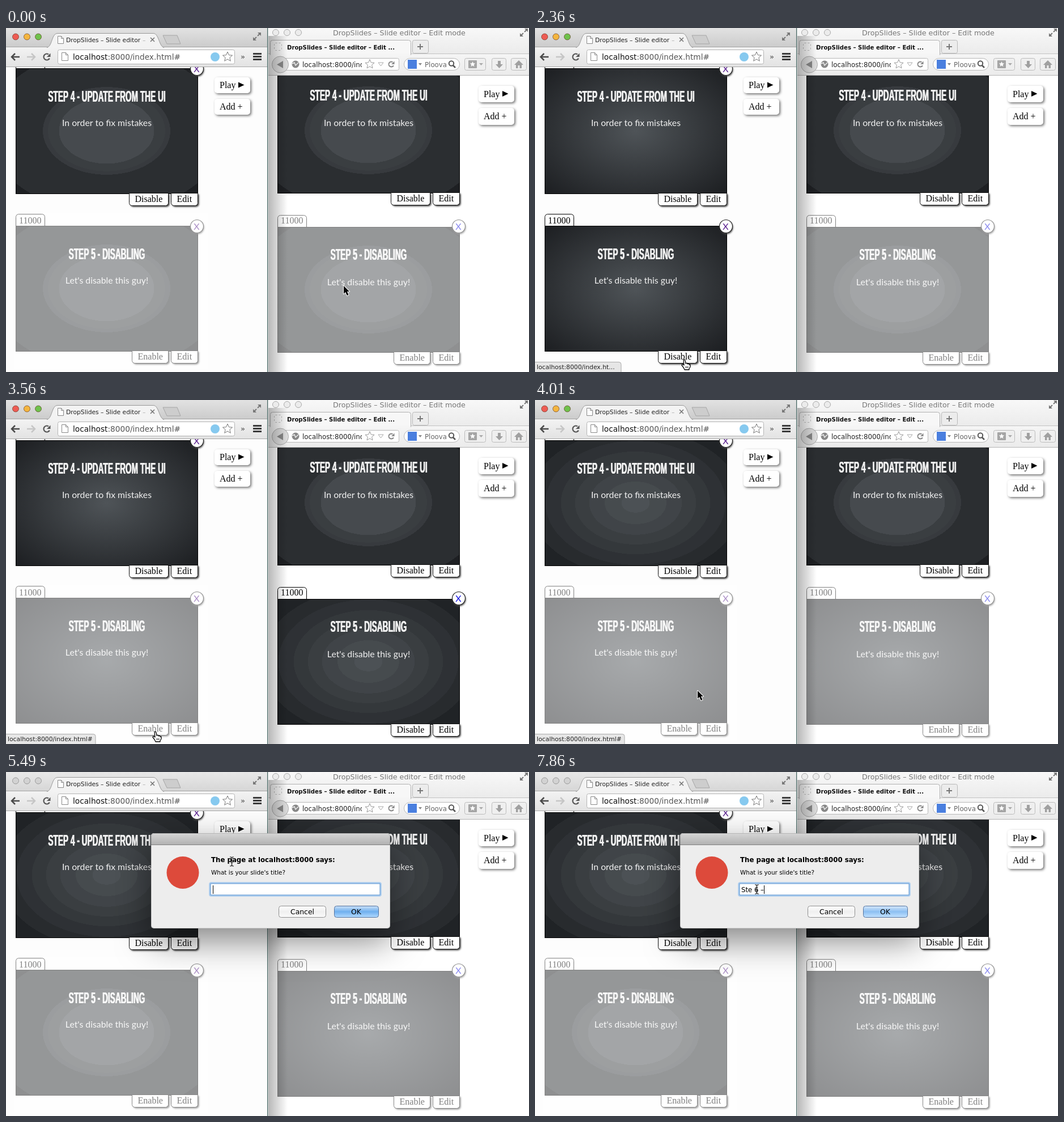
Animation of 923x607 px, one loop 8 s. Source, as an HTML page with a canvas:

```html
<!DOCTYPE html>
<html lang="en">
<head>
<meta charset="utf-8">
<title>Slide editor</title>
<style>
  html, body { margin: 0; width: 100%; height: 100%; overflow: hidden; background: #fff; }
  canvas { display: block; }
</style>
</head>
<body>
<canvas id="stage" width="923" height="607"></canvas>
<script>
const ctx = document.getElementById('stage').getContext('2d');
const LOOP = 8000, TICK = 148.2;
const UI = '"DejaVu Sans", sans-serif';
const SERIF = '16px "Liberation Serif", serif';
const BODY = '15.8px Lato, sans-serif';
const HEADING = 'bold 28px "Liberation Sans", sans-serif';
const HEADING_CONDENSE = 0.489;

// Gradient band edges as fractions of the radius; null is a smooth ramp.
const COARSE = [.37, .455, .495, .92, 1];
const MEDIUM = [.11, .24, .36, .47, .58, .7, .83, 1];
const SMOOTH = null;

// Pointer path: tick, x, y
const POINTER = [
  [0, 596, 455], [4, 385, 383], [5, 396, 385], [8, 396, 385], [9, 374, 448],
  [14, 264, 586], [26, 264, 586], [32, 400, 145], [34, 400, 145],
  [35, 398, 158], [38, 398, 158], [41, 391, 207]
];

function text(str, x, y, font, color, align = 'left') {
  ctx.font = font;
  ctx.fillStyle = color;
  ctx.textAlign = align;
  ctx.fillText(str, x, y);
}

function rect(x, y, w, h, fill) {
  ctx.fillStyle = fill;
  ctx.fillRect(x, y, w, h);
}

function paint(fill, stroke, width = 1) {
  if (fill) { ctx.fillStyle = fill; ctx.fill(); }
  if (stroke) { ctx.strokeStyle = stroke; ctx.lineWidth = width; ctx.stroke(); }
}

function box(x, y, w, h, r, fill, stroke, width) {
  ctx.beginPath();
  ctx.roundRect(x, y, w, h, r);
  paint(fill, stroke, width);
}

function circle(x, y, r, fill, stroke, width) {
  ctx.beginPath();
  ctx.arc(x, y, r, 0, 7);
  paint(fill, stroke, width);
}

function shape(points, fill, stroke, width, closed = true) {
  ctx.beginPath();
  points.forEach(([x, y]) => ctx.lineTo(x, y));
  if (closed) ctx.closePath();
  paint(fill, stroke, width);
}

const line = (points, color, width) => shape(points, null, color, width, false);

function star(cx, cy, r, fill, stroke) {
  const points = Array.from({ length: 10 }, (_, i) => {
    const a = i * Math.PI / 5 - Math.PI / 2, d = i % 2 ? r * .45 : r;
    return [cx + d * Math.cos(a), cy + d * Math.sin(a)];
  });
  shape(points, fill, stroke);
}

function ramp(y0, y1, ...colors) {
  const g = ctx.createLinearGradient(0, y0, 0, y1);
  colors.forEach((c, i) => g.addColorStop(i / (colors.length - 1), c));
  return g;
}

function withShadow(color, dx, dy, blur, draw) {
  ctx.save();
  ctx.shadowColor = color;
  ctx.shadowOffsetX = dx;
  ctx.shadowOffsetY = dy;
  ctx.shadowBlur = blur;
  draw();
  ctx.restore();
}

function clipped(x, y, w, h, draw) {
  ctx.save();
  ctx.beginPath();
  ctx.rect(x, y, w, h);
  ctx.clip();
  draw();
  ctx.restore();
}

function slideTone(f) {
  const mix = (a, b) => Math.round(a + (b - a) * f);
  return `rgb(${mix(79, 28)},${mix(84, 30)},${mix(88, 33)})`;
}

function slideBackground(x, y, bands) {
  ctx.save();
  ctx.translate(x + 160.5, y + 110.5);
  ctx.scale(1, 221 / 321);
  const g = ctx.createRadialGradient(0, 0, 0, 0, 0, 227);
  if (bands) {
    let from = 0;
    for (const to of bands) {
      const c = slideTone((from + to) / 2);
      g.addColorStop(from, c);
      g.addColorStop(to, c);
      from = to;
    }
  } else {
    g.addColorStop(0, slideTone(0));
    g.addColorStop(1, slideTone(1));
  }
  rect(-160.5, -160.5, 321, 321, g);
  ctx.restore();
}

function heading(str, x, y) {
  ctx.save();
  ctx.translate(x, y);
  ctx.scale(HEADING_CONDENSE, 1);
  for (const dx of [-.8, .8]) text(str, dx, 0, HEADING, '#f1f1f1', 'center');
  ctx.restore();
}

function tabButton(label, right, y) {
  ctx.font = SERIF;
  const w = Math.round(ctx.measureText(label).width + 21);
  withShadow('#333', 2, 2, 3, () => box(right - w + .5, y, w - 1, 22, [0, 0, 5, 5], '#fff'));
  box(right - w + .5, y, w - 1, 22, [0, 0, 5, 5], null, '#111');
  text(label, right - w + 10.5, y + 15.5, SERIF, '#000');
}

function slide({ x, y, title, body, time, enabled, bands, link, shift }) {
  box(x + .5, y - 20.5, 51, 21, [5, 5, 0, 0], '#fff', '#000');
  text(time, x + 6, y - 4 - shift * 2, SERIF, '#000');
  slideBackground(x, y, bands);
  ctx.strokeStyle = '#000';
  ctx.lineWidth = 1;
  ctx.strokeRect(x + .5, y + .5, 321, 221);
  heading(title, x + 161, y + 59 - shift);
  text(body, x + 161, y + 102 + shift, BODY, '#f1f1f1', 'center');
  tabButton(enabled ? 'Disable' : 'Enable', x + 270, y + 220.5);
  tabButton('Edit', x + 322, y + 220.5);
  withShadow('#444', 1, 2, 3, () => circle(x + 320, y + 1 - shift * 2, 11.5, '#fff'));
  circle(x + 320, y + 1 - shift * 2, 11.5, null, '#222', 1.2);
  text('X', x + 319.5, y + 6.5 - shift * 2, BODY, link, 'center');
  if (!enabled) rect(x - 2, y - 23, 342, 275, 'rgba(255,255,255,.5)');
}

function sideButton(label, x, y, h) {
  withShadow('rgba(0,0,0,.55)', 2, 2, 4, () => box(x, y, 63, h, 5, '#fff'));
  text(label, x + 9, y + h / 2 + 5, SERIF, '#000');
  if (label === 'Play') {
    const m = y + h / 2 - .5;
    shape([[x + 42, m - 5], [x + 52.5, m], [x + 42, m + 5]], '#000');
  }
}

function pages(k) {
  const four = { title: 'STEP 4 - UPDATE FROM THE UI', body: 'In order to fix mistakes', time: '9000', enabled: true };
  const five = { title: 'STEP 5 - DISABLING', body: "Let's disable this guy!", time: '11000' };
  const left = { x: 17, link: '#551a8b', shift: 0 };
  const right = { x: 479, link: '#1010e0', shift: 1 };

  rect(0, 0, 923, 607, '#fff');
  clipped(0, 69, 461, 538, () => {
    rect(0, 69, 461, 538, '#fdfdfd');
    slide({ ...four, ...left, y: 71, bands: k < 16 ? COARSE : k < 27 ? SMOOTH : MEDIUM });
    slide({ ...five, ...left, y: 349, enabled: k >= 16 && k < 23, bands: k < 16 || k > 34 ? COARSE : SMOOTH });
    sideButton('Play', 368, 87, 28);
    sideButton('Add +', 368, 125, 28);
    if (k >= 14 && k < 35) statusBar(k < 23 ? ['localhost:8000/index.ht...', 152] : ['localhost:8000/index.html#', 158]);
  });
  clipped(463, 83, 460, 524, () => {
    slide({ ...four, ...right, y: 70, bands: k < 35 ? COARSE : MEDIUM });
    slide({ ...five, ...right, y: 351, enabled: k >= 18 && k < 27, bands: k < 18 ? COARSE : k < 27 ? MEDIUM : SMOOTH });
    sideButton('Play', 834, 102, 29);
    sideButton('Add +', 834, 141, 30);
  });
}

function statusBar([label, width]) {
  box(-5, 589.5, width + 5, 24, 4, '#e6e6e6', '#aaa');
  text(label, 3, 602, '10.8px ' + UI, '#222');
}

function reload(x, y, r, color, width) {
  ctx.beginPath();
  ctx.arc(x, y, r, .5, 5.3);
  paint(null, color, width);
  shape([[x + r + 1, y - r - 1], [x + r + 1, y], [x, y]], color);
}

function arrow(x, y, dir, color) {
  line([[x - dir * 7, y], [x + dir * 6, y]], color, 2.5);
  line([[x + dir, y - 6], [x + dir * 7, y], [x + dir, y + 6]], color, 2.5);
}

function fullscreenIcon(x, y) {
  shape([[x + 7, y - 7], [x + 7, y - 1], [x + 1, y - 7]], '#777');
  shape([[x - 7, y + 7], [x - 7, y + 1], [x - 1, y + 7]], '#777');
  line([[x + 1, y - 1], [x + 5, y - 5]], '#777', 2);
  line([[x - 1, y + 1], [x - 5, y + 5]], '#777', 2);
}

function documentIcon(x, y, w, h) {
  shape([[x, y], [x + w - 4, y], [x + w, y + 4], [x + w, y + h], [x, y + h]], '#fff', '#888');
  line([[x + w - 4, y], [x + w - 4, y + 4], [x + w, y + 4]], '#888', 1);
}

function leftBrowser(focused) {
  rect(0, 0, 461, 34, focused ? ramp(0, 34, '#e2e2e2', '#cbcbcb') : ramp(0, 34, '#e8e8e8', '#d6d6d6'));
  ['#ee5c54', '#f4b63f', '#6fc24c'].forEach((c, i) =>
    circle(17 + 20 * i, 15.5, 5.5, focused ? c : '#d2d2d2', focused ? 'rgba(90,40,20,.6)' : '#999'));
  fullscreenIcon(443, 15);
  shape([[277, 13], [302, 13], [308, 28], [284, 28]], '#cdcdcd', '#a5a5a5');
  rect(0, 34, 461, 35, ramp(34, 69, '#f3f3f3', '#e2e2e2'));
  rect(0, 33, 461, 1, '#a4a4a4');
  ctx.beginPath();
  ctx.moveTo(72, 34.5);
  ctx.bezierCurveTo(82, 33, 80, 9.5, 91, 9.5);
  ctx.lineTo(260, 9.5);
  ctx.bezierCurveTo(270, 9.5, 270, 33, 279, 34.5);
  paint('#f3f3f3', '#999');
  documentIcon(91.5, 14.5, 10, 13);
  text('DropSlides – Slide editor', 106, 25, '10.75px ' + UI, '#222');
  text('–', 241, 25, '10.75px ' + UI, '#aaa');
  line([[255, 17], [262, 24]], '#777', 1.6);
  line([[262, 17], [255, 24]], '#777', 1.6);
  rect(0, 68, 461, 1, '#a8a8a8');
  arrow(17, 51, -1, '#4a4a4a');
  arrow(44, 51, 1, '#c6c6c6');
  reload(72, 51, 5.5, '#555', 2.2);
  box(91.5, 38.5, 312, 25, 3, '#fff', '#b4b4b4');
  documentIcon(98.5, 43.5, 11, 14);
  text('localhost', 118, 56, '13.7px ' + UI, '#111');
  text(':8000/index.html#', 118 + ctx.measureText('localhost').width, 56, '13.7px ' + UI, '#555');
  circle(369, 51, 8, '#86c9ef');
  star(391, 51, 9, '#fff', '#777');
  text('»', 414, 55, '13px ' + UI, '#444');
  for (const y of [44, 49, 54]) rect(436, y, 15, 3, '#3c3c3c');
}

function rightBrowser() {
  const title = 'DropSlides – Slide editor – Edit';
  rect(463, 0, 460, 46, ramp(0, 46, '#f8f8f8', '#ebebeb'));
  rect(463, 46, 460, 38, ramp(46, 84, '#f5f5f5', '#ebebeb'));
  for (const x of [476, 496, 516]) circle(x, 8, 5.5, '#ececec', '#aaa');
  text(title + ' mode', 694, 13, '12.7px ' + UI, '#777', 'center');
  fullscreenIcon(914, 8);
  rect(463, 45, 460, 1, '#c2c2c2');
  box(466.5, 21.5, 248, 26, [4, 4, 0, 0], '#f7f7f7', '#b0b0b0');
  rect(467, 45, 247, 4, '#f5f5f5');
  ctx.setLineDash([3, 3]);
  box(473.5, 26.5, 13, 13, 2, null, '#bbb');
  ctx.setLineDash([]);
  text(title + ' ...', 496, 38, 'bold 10.15px ' + UI, '#111');
  box(717.5, 21.5, 28, 23, 3, '#ececec', '#b8b8b8');
  rect(726, 32, 10, 2, '#777');
  rect(730, 28, 2, 10, '#777');

  box(490, 53.5, 203.5, 21, 3, '#fff', '#b8b8b8');
  circle(484, 64.5, 14.5, '#dcdcdc', '#a8a8a8');
  shape([[478, 64.5], [489, 58], [489, 71]], '#888');
  circle(511, 64, 6.5, '#888');
  line([[505, 63], [509, 61], [511, 66], [514, 63], [516, 61]], '#eee', 1.5);
  clipped(500, 50, 128, 30, () => text('localhost:8000/index', 523, 69, '11.8px ' + UI, '#222'));
  star(642, 64, 8.5, '#fff', '#999');
  shape([[657, 61], [666, 61], [661.5, 67]], '#fff', '#aaa');
  reload(680, 64, 4.5, '#888', 2);
  box(702.5, 53.5, 98, 21, 10.5, '#fff', '#b8b8b8');
  rect(709, 56, 16, 16, '#4a7fdf');
  shape([[728, 62], [734, 62], [731, 66]], '#888');
  text('Ploova', 739, 69, '11.8px ' + UI, '#666');
  circle(786, 62.5, 4.2, null, '#555', 2);
  line([[789, 66], [793, 70]], '#555', 2.5);
  for (const [x, w] of [[809.5, 37], [857.5, 25], [891.5, 27]]) box(x, 53.5, w, 21, 3, '#efefef', '#bbb');
  box(816, 57, 15, 14, 1, '#a5a5a5');
  star(823.5, 64, 5, '#fff');
  shape([[835, 62], [842, 62], [838.5, 66]], '#aaa');
  shape([[868, 58], [873, 58], [873, 64], [877, 64], [870.5, 71], [864, 64], [868, 64]], '#a0a0a0');
  shape([[905, 57], [913, 65], [910, 65], [910, 71], [900, 71], [900, 65], [897, 65]], '#a0a0a0');
  rect(903.5, 66, 3, 5, '#efefef');
  rect(463, 83, 460, 1, '#b5b5b5');
}

function windowEdge() {
  const g = ctx.createLinearGradient(463, 0, 497, 0);
  g.addColorStop(0, 'rgba(0,0,0,.28)');
  g.addColorStop(.5, 'rgba(0,0,0,.14)');
  g.addColorStop(1, 'rgba(0,0,0,0)');
  rect(463, 14, 34, 593, g);
  rect(461, 0, 1, 607, '#3f5f5c');
  rect(462, 0, 1, 607, '#c9d2d0');
}

function dialog(k) {
  if (k < 34) return;
  ctx.save();
  if (k === 34) {
    ctx.globalAlpha = .35;
    ctx.translate(466, 194);
    ctx.scale(.256, .256);
    ctx.translate(-467, -192);
  }
  withShadow('rgba(0,0,0,.48)', 0, 22, 60, () => box(256, 108, 422, 168, 5, '#ededed'));
  box(256, 108, 422, 21, [5, 5, 0, 0], ramp(108, 129, '#d6d6d6', '#b0b0b0'));
  rect(256, 128, 422, 1, '#808080');
  box(256.5, 108.5, 421, 167, 5, null, 'rgba(0,0,0,.15)');
  circle(312, 177.5, 28.5, '#dd4a3b');
  text('The page at localhost:8000 says:', 362, 159, 'bold 11.77px ' + UI, '#000');
  text("What is your slide's title?", 362, 181, '10.45px ' + UI, '#000');

  box(360, 196, 301, 22, 2, '#fff', '#a9cbee', 3.5);
  box(361, 197, 299, 20, 0, '#fff', '#5b93cf', 1);
  const count = Math.max(0, Math.round((k - 41) * .75));
  const typed = 'Ste 6 –'.slice(0, count);
  text(typed, 364, 212, '11.7px ' + UI, '#000');
  rect(Math.round(364.5 + ctx.measureText(typed).width), 200, 1, 15, '#000');

  box(481.5, 236.5, 83, 20, 4, ramp(236, 257, '#fff', '#f0f0f0', '#fafafa'), '#909090');
  text('Cancel', 523, 251, '12.4px ' + UI, '#000', 'center');
  box(579.5, 236.5, 78, 20, 4, ramp(236, 257, '#cfe3f8', '#70b0ef', '#b5dcff'), '#5574a0');
  const glow = .12 - .12 * Math.cos((k - 37) * TICK / 1000 * Math.PI * 2);
  box(580, 237, 77, 19, 4, `rgba(255,255,255,${glow})`);
  text('OK', 618, 251, '12.4px ' + UI, '#000', 'center');
  ctx.restore();
}

function pointerAt(k) {
  const next = POINTER.findIndex(p => p[0] > k);
  if (next < 0) return POINTER.at(-1).slice(1);
  const [t0, x0, y0] = POINTER[next - 1], [t1, x1, y1] = POINTER[next];
  const f = (k - t0) / (t1 - t0);
  return [x0 + (x1 - x0) * f, y0 + (y1 - y0) * f];
}

function pointer(k) {
  const [x, y] = pointerAt(k).map(Math.round);
  ctx.save();
  ctx.translate(x, y);
  ctx.lineJoin = 'round';
  if (k >= 35) {
    line([[-3, -8], [-1, -8], [.5, -6.5], [2, -8], [4, -8]], '#222', 1.2);
    line([[-3, 8], [-1, 8], [.5, 6.5], [2, 8], [4, 8]], '#222', 1.2);
    line([[.5, -7], [.5, 7]], '#222', 1.2);
    line([[-1.5, 2], [2.5, 2]], '#222', 1);
  } else if (k >= 14 && k < 27) {
    shape([[-2, 0], [0, -1], [1, 1], [2, 6], [4, 5], [5, 7], [7, 6], [8, 8], [10, 8],
      [10, 12], [8, 15], [8, 17], [0, 17], [-2, 13], [-5, 9], [-4, 7], [-1, 9]], '#fff', '#000', 1.3);
    for (const fx of [2, 4, 6]) line([[fx, 11], [fx, 14]], '#000', .8);
  } else {
    const outline = [[0, 0], [0, 14], [3, 11], [6, 17], [8.5, 16], [6, 10], [10, 10]];
    shape(outline, null, '#fff', 2);
    shape(outline, '#000');
  }
  ctx.restore();
}

function draw(now) {
  const k = Math.floor((now % LOOP + 12) / TICK);
  pages(k);
  leftBrowser(k < 34);
  rightBrowser();
  windowEdge();
  dialog(k);
  pointer(k);
}

const start = performance.now();
function frame() {
  draw(performance.now() - start);
  requestAnimationFrame(frame);
}
frame();
</script>
</body>
</html>
```
